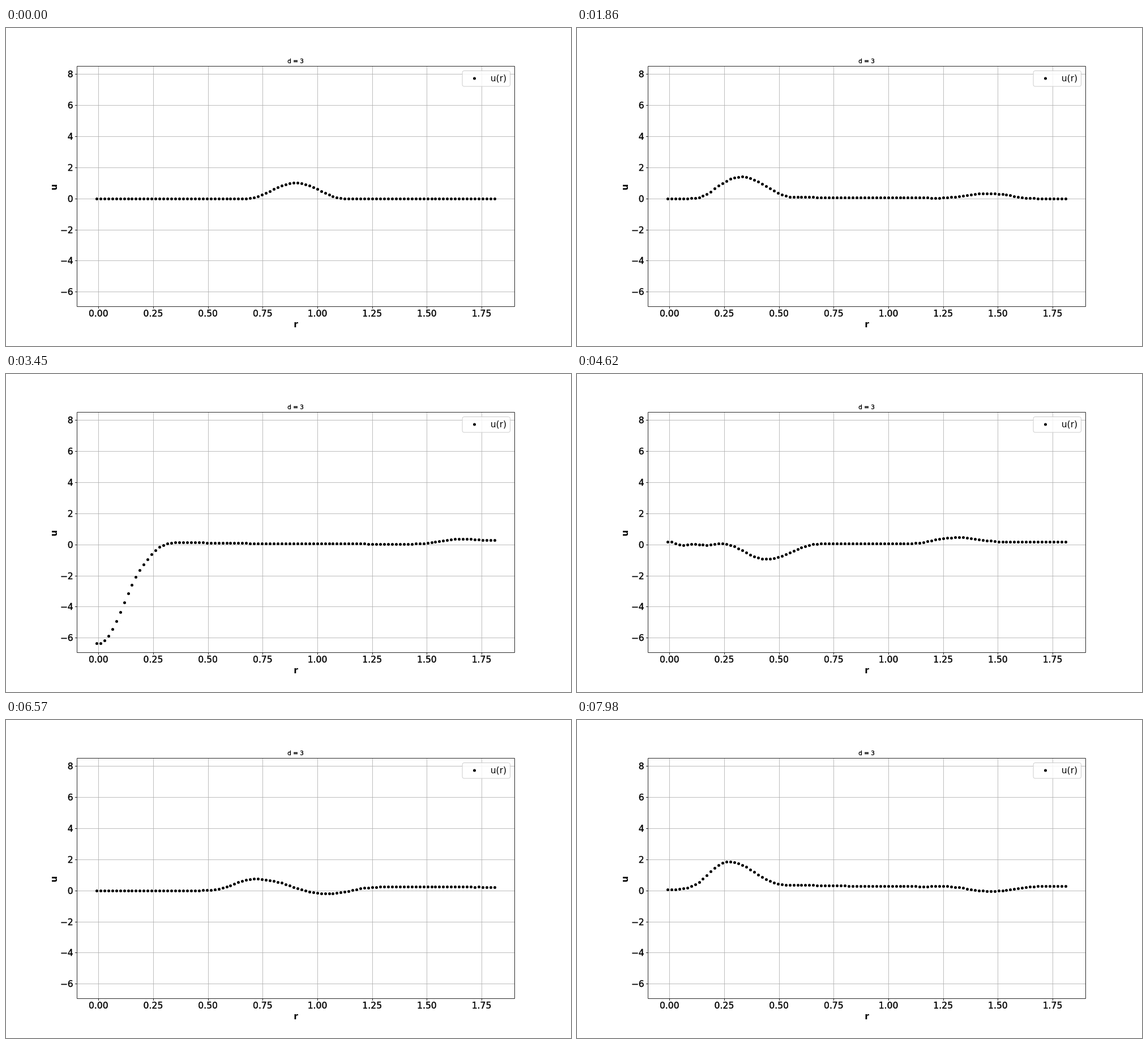
Animation of 998 by 561 pixels, one loop 8000 ms. Source, as an HTML page:

```html
<!DOCTYPE html>
<html lang="en">
<head>
<meta charset="utf-8">
<title>Radial wave</title>
<style>
  html, body { margin: 0; width: 100%; height: 100%; overflow: hidden; background: #fff; }
  svg { display: block; width: 998px; height: 561px; }
  text { font: 15.6px "DejaVu Sans", sans-serif; }
  .heavy { stroke: #000; stroke-width: .4px; }
  .label { font-weight: bold; }
  .title { font-size: 10.4px; }
  path { fill: none; stroke-width: .83px; }
</style>
</head>
<body>
<svg id="stage" viewBox="0 0 998 561"></svg>
<script>
const LOOP = 8000, FRAME = 30, FRAMES = 267;
const CELLS = 100, RADIUS = 1.8, DR = RADIUS / CELLS, DT = DR / 2, DIM = 3;
const BOX = { left: 125.5, right: 898.5, top: 67.5, bottom: 491.5 };

const snap = v => Math.round(v) + .5;
const px = r => snap(163.3 + 386.72 * r);
const py = u => snap(300.75 - 27.42 * u);

const stage = document.getElementById('stage');
function add(tag, attrs, content = '') {
  const el = document.createElementNS('http://www.w3.org/2000/svg', tag);
  for (const name in attrs) el.setAttribute(name, attrs[name]);
  el.textContent = content;
  return stage.appendChild(el);
}
const line = (d, stroke) => add('path', { d, stroke });
const label = (x, y, content, anchor, cls, more) =>
  add('text', { x, y, 'text-anchor': anchor, class: cls, ...more }, content);
const dot = (cx, cy) => add('circle', { cx, cy, r: 2.5 });

// Axes
for (let r = 0; r <= 1.75; r += .25) {
  const x = px(r);
  line(`M${x} ${BOX.top}V${BOX.bottom}`, '#b0b0b0');
  line(`M${x} ${BOX.bottom}v3.6`, '#000');
  label(163.3 + 386.72 * r, 509.3, r.toFixed(2), 'middle', 'heavy');
}
for (let u = -6; u <= 8; u += 2) {
  const y = py(u);
  line(`M${BOX.left} ${y}H${BOX.right}`, '#b0b0b0');
  line(`M${BOX.left} ${y}h-3.6`, '#000');
  label(118.7, y + 5.5, String(u).replace('-', '\u2212'), 'end', 'heavy');
}
line(`M${BOX.left} ${BOX.top}H${BOX.right}V${BOX.bottom}H${BOX.left}Z`, '#000');
label(511.5, 62, 'd = 3', 'middle', 'heavy title');
label(512, 527.7, 'r', 'middle', 'label');
label(89.5, 281, 'u', 'middle', 'label', { transform: 'rotate(-90 89.5 281)' });

// Wave: u_tt = u_rr + (d-1)/r u_r with mirrored ghost cells at both ends
const radii = Array.from({ length: CELLS + 2 }, (_, i) => (i - .5) * DR);
const pulse = r => {
  const d = Math.abs(r - .9) / .225;
  return d < 1 ? (1 + Math.cos(Math.PI * d)) / 2 : 0;
};
function advance(u, nextValue) {
  const next = u.slice();
  for (let i = 1; i <= CELLS; i++) {
    const laplacian = (u[i + 1] - 2 * u[i] + u[i - 1]) / DR ** 2
      + (DIM - 1) / radii[i] * (u[i + 1] - u[i - 1]) / (2 * DR);
    next[i] = nextValue(i, DT * DT * laplacian);
  }
  next[0] = next[1];
  next[CELLS + 1] = next[CELLS];
  return next;
}
const start = radii.map(pulse);
const history = [start, advance(start, (i, a) => start[i] * (1 + DT / RADIUS) + a / 2)];
while (history.length < FRAMES) {
  const [before, now] = history.slice(-2);
  history.push(advance(now, (i, a) => 2 * now[i] - before[i] + a));
}

const dots = radii.map(r => dot(px(r), py(0)));

// Legend
add('rect', { x: 806, y: 75.5, width: 84.5, height: 27.5, rx: 3.1,
  fill: '#fff', 'fill-opacity': .8, stroke: '#ccc' });
dot(827.5, 89);
label(855.7, 94.2, 'u(r)', 'start', '');

function draw() {
  const u = history[Math.floor(performance.now() % LOOP / FRAME)];
  dots.forEach((d, i) => d.setAttribute('cy', py(u[i])));
  requestAnimationFrame(draw);
}
draw();
</script>
</body>
</html>
```
